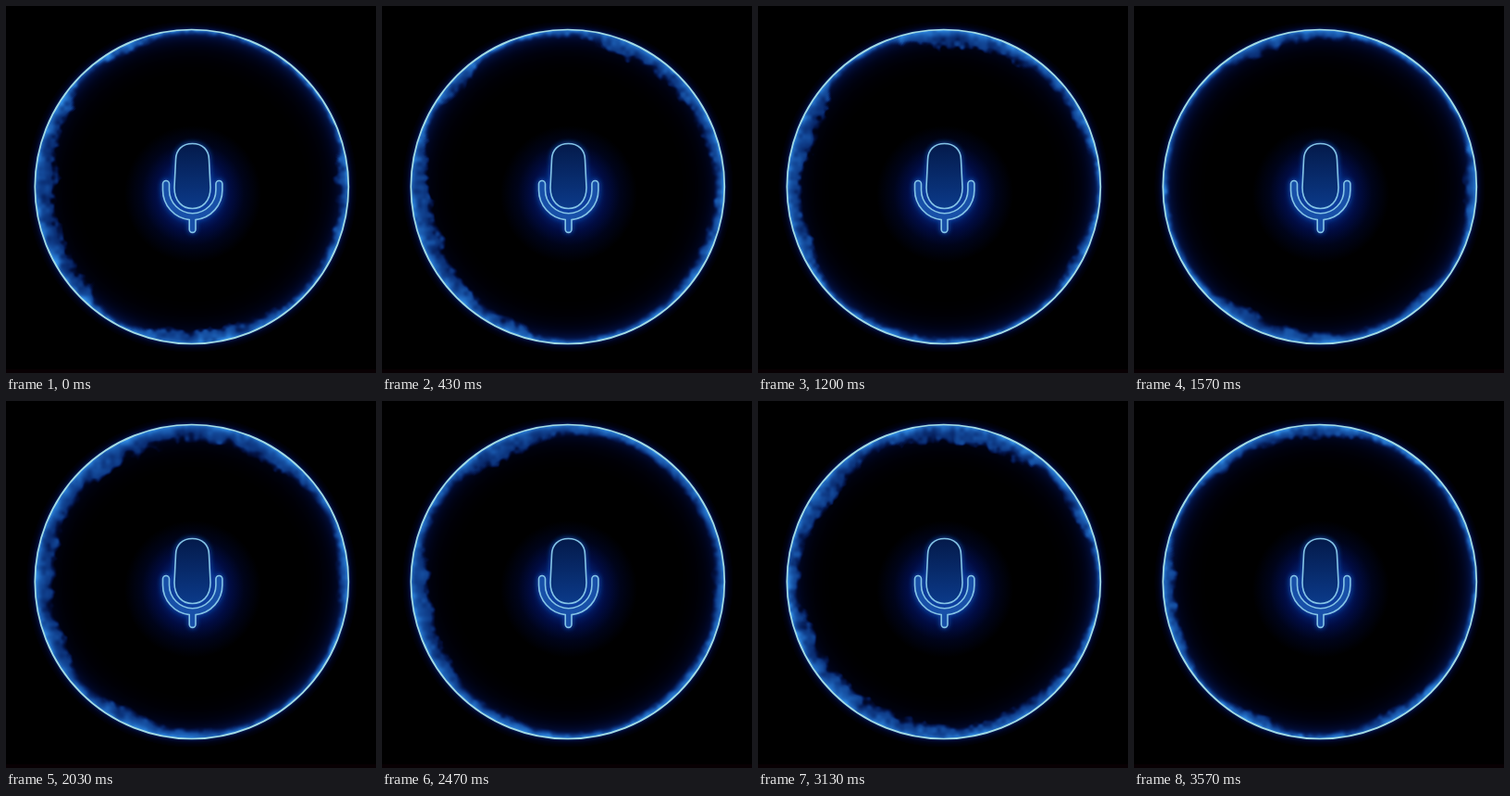
Animation of 400x396 px, one loop 3.61 s. Source, as an HTML page with a canvas:

```html
<!DOCTYPE html>
<html lang="en">
<head>
<meta charset="utf-8">
<style>
  html, body { margin: 0; width: 100%; height: 100%; overflow: hidden; background: #000; }
  canvas, svg { position: absolute; left: 0; top: 0; }
</style>
</head>
<body>
<canvas id="smoke" width="400" height="396"></canvas>
<svg width="400" height="396" fill="none">
  <defs>
    <radialGradient id="halo">
      <stop offset="0" stop-color="#07359a"/>
      <stop offset=".35" stop-color="#042378"/>
      <stop offset=".55" stop-color="#010c42"/>
      <stop offset=".75" stop-color="#00041a"/>
      <stop offset="1" stop-color="#000"/>
    </radialGradient>
    <linearGradient id="body" x2="0" y2="1">
      <stop offset="0" stop-color="#041a4a"/>
      <stop offset="1" stop-color="#0b3a8a"/>
    </linearGradient>
    <filter id="blur" x="-30%" y="-30%" width="160%" height="160%"><feGaussianBlur stdDeviation="2.5"/></filter>
    <path id="capsule" d="M183.5 166C183.5 155 191 148.5 201.5 148.5S219.5 155 219.5 166L221 196C221 211 212 218.5 201.5 218.5S182 211 182 196Z"/>
    <path id="cradle" d="M169.5 192a3.5 3.5 0 0 1 7 0V198.5a25.2 25.2 0 0 0 50.4 0V192a3.5 3.5 0 0 1 7 0V198.5A32.2 32.2 0 0 1 205 230.6V241a3.4 3.4 0 0 1-6.8 0V230.6A32.2 32.2 0 0 1 169.5 198.5Z"/>
  </defs>
  <rect y="392" width="400" height="4" fill="#080003"/>
  <circle cx="202" cy="203" r="74" fill="url(#halo)"/>
  <g stroke="#1450b4" stroke-width="3" filter="url(#blur)"><use href="#capsule"/><use href="#cradle"/></g>
  <g stroke="#84c4e6" stroke-width="1.6">
    <use href="#capsule" fill="url(#body)"/>
    <use href="#cradle" fill="#1850a8"/>
  </g>
  <circle cx="200.8" cy="195" r="169.5" stroke="#a4dbe2" stroke-width="1.7"/>
</svg>
<script>
const LOOP = 3610, W = 400, H = 396, CX = 200.8, CY = 195, R = 169.5;
const STEPS = 720, REACH = 48;
const ctx = document.getElementById('smoke').getContext('2d');
const image = ctx.createImageData(W, H);

// Pixels close enough to the rim to be lit
const rim = [];
for (let y = 0; y < H; y++) {
  for (let x = 0; x < W; x++) {
    const dx = x + .5 - CX, dy = y + .5 - CY, inset = R - Math.hypot(dx, dy);
    if (inset < -9 || inset > REACH) continue;
    const turn = Math.atan2(dy, dx) / (2 * Math.PI) + 1;
    rim.push({ x, y, inset, slot: Math.floor(turn * STEPS) % STEPS });
  }
}

let seed = 7;
const lattice = Float32Array.from({ length: 4096 }, () => (seed = seed * 16807 % 2147483647) / 2147483647);
const ease = u => u * u * (3 - 2 * u);
const clamp = u => Math.max(0, Math.min(1, u));
const mix = (a, b, u) => a + (b - a) * u;

function noise(x, y, z) {
  const xi = Math.floor(x), yi = Math.floor(y), zi = Math.floor(z);
  const u = ease(x - xi), v = ease(y - yi), w = ease(z - zi);
  const at = (i, j, k) => lattice[(xi + i) * 57 + (yi + j) * 1013 + (zi + k) * 331 & 4095];
  const layer = k => mix(mix(at(0, 0, k), at(1, 0, k), u), mix(at(0, 1, k), at(1, 1, k), u), v);
  return mix(layer(0), layer(1), w);
}

// Slow billows around the rim, thickest on the upper left
function smokeDepth(slot, t) {
  const angle = slot / STEPS * 2 * Math.PI;
  const billow = noise(9 + 2.4 * Math.cos(angle), 9 + 2.4 * Math.sin(angle), t / 380);
  return 3 + 17 * ease(clamp(billow * 1.5 - .3)) * (.7 + .3 * Math.cos(angle - 3.6));
}

function glow({ x, y, inset }, depth, t) {
  if (inset < 0) return .42 * Math.exp(inset / 2.5);
  const haze = (.3 * Math.exp(-inset / 4.5) + .32 * Math.exp(-inset / 14)) * (1 - inset / REACH);
  if (inset > depth + 12) return haze;
  const n = .6 * noise(x / 11, y / 11, t / 260) + .4 * noise(x / 5, y / 5, t / 150 + 40);
  const edge = depth + (n - .5) * depth;
  return haze + ease(clamp((edge - inset) / 8 + .5)) * (.12 + .5 * n);
}

function draw(now) {
  const t = now % LOOP;
  const depths = Float32Array.from({ length: STEPS }, (_, slot) => smokeDepth(slot, t));
  for (const p of rim) {
    const v = glow(p, depths[p.slot], t);
    const i = (p.y * W + p.x) * 4;
    image.data[i] = 48 * v * v;
    image.data[i + 1] = 138 * v ** 1.4;
    image.data[i + 2] = 225 * v ** .85;
    image.data[i + 3] = 255;
  }
  ctx.putImageData(image, 0, 0);
  requestAnimationFrame(draw);
}
requestAnimationFrame(draw);
</script>
</body>
</html>
```
